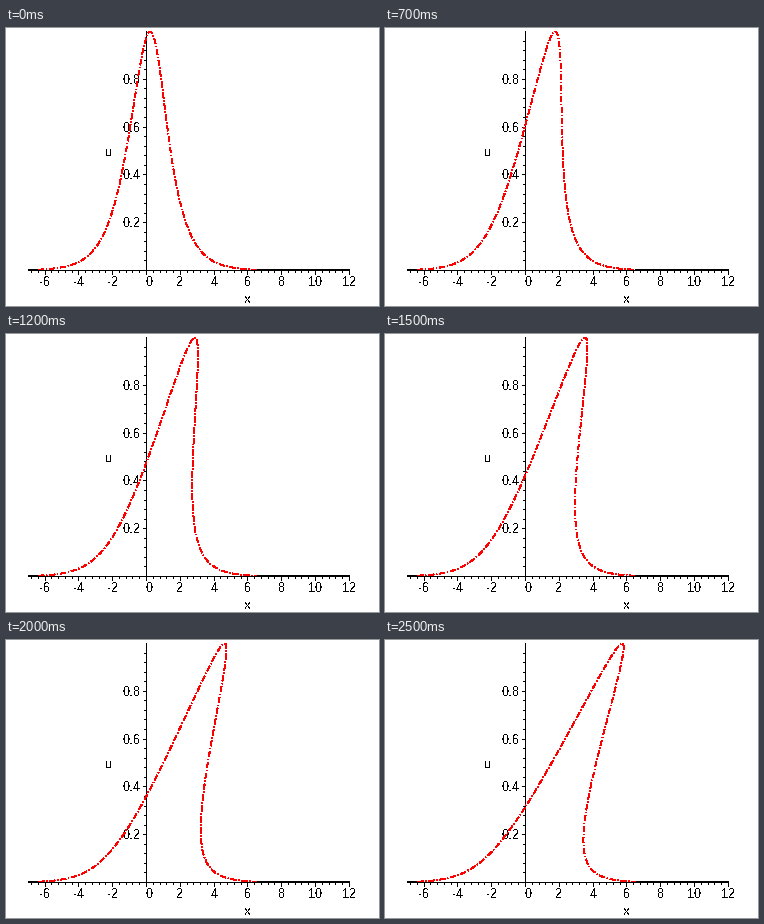
Recreate the animation shown at these times as a matplotlib script. Size 373 by 278 pixels, loop 2600 ms.

```python
import numpy as np
import matplotlib.pyplot as plt
from matplotlib.animation import FuncAnimation

WIDTH, HEIGHT, DPI = 373, 278, 100
FRAMES, INTERVAL = 26, 100
TIME_STEP = 0.22
AXIS_X, AXIS_Y = 140, 242
UNIT_X, UNIT_Y = 16.9, 239

plt.rcParams.update({
    "font.family": "Liberation Sans",
    "font.size": 13 * 72 / DPI,
    "text.antialiased": False,
    "text.hinting": "native",
    "text.hinting_factor": 1,
    "lines.scale_dashes": False,
})


def px(points):
    return points * 72 / DPI


def to_x(value):
    return AXIS_X + 0.5 + UNIT_X * value


def to_y(value):
    return AXIS_Y + 0.5 - UNIT_Y * value


fig = plt.figure(figsize=(WIDTH / DPI, HEIGHT / DPI), dpi=DPI, facecolor="white")
ax = fig.add_axes([0, 0, 1, 1])
ax.set_xlim(0, WIDTH)
ax.set_ylim(HEIGHT, 0)
ax.axis("off")


def line(x0, y0, x1, y1, zorder=1):
    """Fill one row or column of pixels, both ends included."""
    ax.plot([x0 + 0.5, x1 + 0.5], [y0 + 0.5, y1 + 0.5], color="black",
            lw=px(0.5), antialiased=False, snap=False,
            solid_capstyle="butt", zorder=zorder)


def label(x, y, text, align="center"):
    ax.text(x, y, text, ha=align, va="baseline", zorder=2)


# Axes; the flat tails of the wave thicken the baseline at both ends.
line(22, AXIS_Y, 343, AXIS_Y, zorder=4)
line(AXIS_X, 3, AXIS_X, AXIS_Y)
for start, end in ((22, 32), (250, 343)):
    line(start, AXIS_Y - 1, end, AXIS_Y - 1)

for k in range(-17, 31):
    x = np.floor(to_x(0.4 * k))
    line(x, AXIS_Y, x, AXIS_Y + (4 if k % 5 == 0 else 2))
for k in range(1, 25):
    y = np.floor(to_y(0.04 * k))
    line(AXIS_X - (3 if k % 5 == 0 else 2), y, AXIS_X, y)

for value in range(-6, 13, 2):
    label(to_x(value) + (2.5 if value == 0 else 0), 258, str(value))
for value in (0.2, 0.4, 0.6, 0.8):
    label(134.5, to_y(value) + 4.5, f"{value:.1f}", "right")
label(241, 275, "x")
label(103, 128, "u")

# Each point of the profile u = sech(s) travels at speed u.
start = np.linspace(-6.4, 6.5, 900)
height = 1 / np.cosh(start)
dash_dot = [px(length) for length in (5, 2.5, 1, 2.5)]
wave, = ax.plot([], [], color="red", lw=px(1.4), antialiased=False, snap=False,
                dash_capstyle="butt", linestyle=(0, dash_dot), zorder=3)


def update(frame):
    time = TIME_STEP * (frame + 1)
    wave.set_data(to_x(start + time * height), to_y(height))
    return (wave,)


animation = FuncAnimation(fig, update, frames=FRAMES, interval=INTERVAL,
                          repeat=True, repeat_delay=0, blit=False)
plt.show()
```
